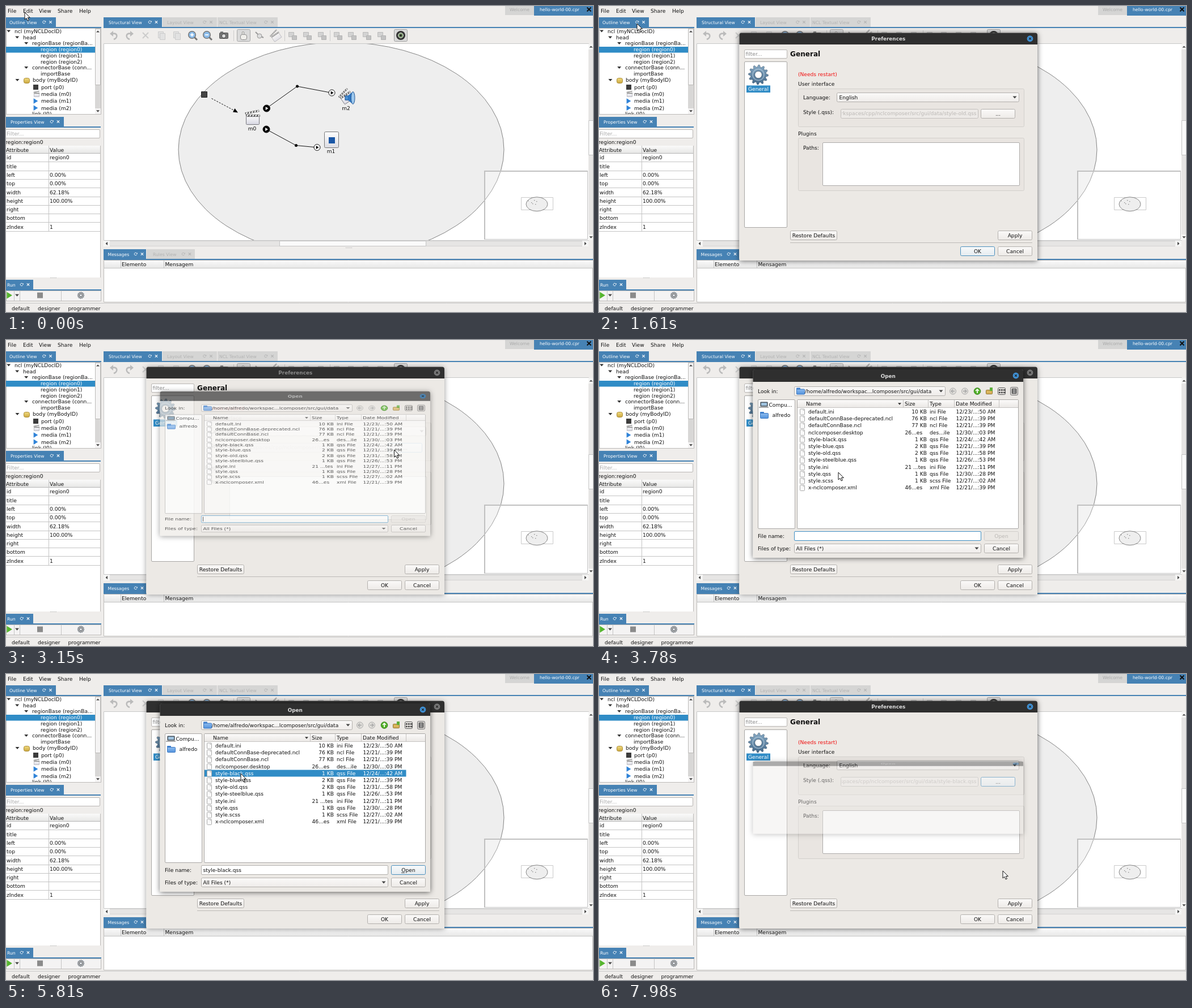
Animation, 1035 px wide and 541 px high, one loop 8000 ms. Source, as an HTML page with a canvas:

```html
<!DOCTYPE html>
<html lang="en">
<head>
<meta charset="utf-8">
<title>Preferences walkthrough</title>
<style>
html, body { margin: 0; width: 100%; height: 100%; overflow: hidden; background: #efedeb; }
canvas { display: block; width: 1035px; height: 541px; }
</style>
</head>
<body>
<canvas id="stage" width="1035" height="541"></canvas>
<script>
const g = document.getElementById('stage').getContext('2d');
const LOOP = 8000, STEP = 70;
const BLUE = '#4682b4', SEL = '#308cc6', BG = '#efedeb', DLG = '#ece9e5', LINE = '#bcbab8';
const FONT = '"DejaVu Sans", sans-serif';

// ---- drawing helpers ----
function rect(x, y, w, h, fill, stroke, r = 0) {
  g.beginPath();
  if (stroke) g.roundRect(x + .5, y + .5, w - 1, h - 1, r);
  else g.roundRect(x, y, w, h, r);
  if (fill) { g.fillStyle = fill; g.fill(); }
  if (stroke) { g.strokeStyle = stroke; g.lineWidth = 1; g.stroke(); }
}
function text(s, x, mid, color = '#111', size = 9.12, align = 'left', weight = '') {
  g.font = `${weight} ${size}px ${FONT}`;
  g.textAlign = align;
  g.fillStyle = color;
  g.fillText(s, x, mid + size * .363);
}
function line(color, width, ...p) {
  g.beginPath();
  for (let i = 0; i < p.length; i += 2) g.lineTo(p[i], p[i + 1]);
  g.strokeStyle = color; g.lineWidth = width; g.stroke();
}
function poly(fill, ...p) {
  g.beginPath();
  for (let i = 0; i < p.length; i += 2) g.lineTo(p[i], p[i + 1]);
  g.closePath();
  g.fillStyle = fill; g.fill();
}
function disc(x, y, r, fill, stroke, w = 1) {
  g.beginPath(); g.arc(x, y, r, 0, 7);
  if (fill) { g.fillStyle = fill; g.fill(); }
  if (stroke) { g.strokeStyle = stroke; g.lineWidth = w; g.stroke(); }
}
function oval(x, y, rx, ry, fill, stroke, w = 1) {
  g.beginPath(); g.ellipse(x, y, rx, ry, 0, 0, 7);
  g.fillStyle = fill; g.fill();
  g.strokeStyle = stroke; g.lineWidth = w; g.stroke();
}
function fade(y, h, a, b) {
  const f = g.createLinearGradient(0, y, 0, y + h);
  f.addColorStop(0, a); f.addColorStop(1, b);
  return f;
}
function at(x, y, draw, scale = 1) {
  g.save(); g.translate(x, y); g.scale(scale, scale); draw(); g.restore();
}
function clip(x, y, w, h, draw) {
  g.save(); g.beginPath(); g.rect(x, y, w, h); g.clip(); draw(); g.restore();
}
const down = (x, y, c = '#333', s = 3.5) => poly(c, x - s, y - s * .55, x + s, y - s * .55, x, y + s * .55);
const up = (x, y) => poly('#444', x - 3, y + 1.6, x + 3, y + 1.6, x, y - 1.6);
const right = (x, y, s, c) => poly(c, x - s * .6, y - s, x - s * .6, y + s, x + s, y);
function cross(x, y, s, c, w = 1.2) {
  line(c, w, x - s, y - s, x + s, y + s);
  line(c, w, x - s, y + s, x + s, y - s);
}

// ---- widgets ----
function tab(s, x, y, w, on, tx, ix) {
  rect(x, y, w, 18, on ? BLUE : '#d5d5d4');
  const c = on ? '#fff' : '#b2b2b2';
  text(s, tx, y + 8.8, c, 7.7);
  g.beginPath(); g.arc(ix, y + 8.5, 2.3, .4, 5.9);
  g.strokeStyle = c; g.lineWidth = .9; g.stroke();
  poly(c, ix + 1.2, y + 8.2, ix + 3.6, y + 8.2, ix + 2.9, y + 6);
  cross(ix + 11.5, y + 8.5, 2.2, c, 1.1);
}
const rule = (x, y, w) => rect(x, y + 17, w, 2, BLUE);
function button(s, x, y, w, o = {}) {
  let fill = fade(y, 16, '#fbfaf9', '#eeebe8');
  if (o.def) fill = fade(y, 16, '#f8fafb', '#e6ecf0');
  if (o.hot) fill = fade(y, 16, '#fff', '#f6f4f2');
  if (o.off) fill = '#ebe8e4';
  if (o.down) fill = '#d9d6d3';
  rect(x, y, w, 17, fill, o.def ? '#4a8fbd' : o.off ? '#d0cdca' : '#b3b0ad', 2);
  text(s, x + w / 2, y + 8.3, o.off ? '#bbb8b5' : '#111', 9.12, 'center');
}
function combo(s, x, y, w, tx) {
  rect(x, y, w, 17, fade(y, 16, '#fbfaf9', '#efecea'), '#b3b0ad', 2);
  text(s, tx, y + 8.4);
  down(x + w - 8, y + 8.5, '#444');
}
const field = (x, y, w, h, edge = '#b9b6b3') => rect(x, y, w, h, '#fff', edge, 1.5);

// ---- icons ----
function clapper() {
  rect(-12, -1, 24, 15, fade(-1, 15, '#fafafa', '#d6d6e2'), '#77777d', 1);
  const bar = () => {
    rect(-12, -4, 25, 3.4, '#484848');
    for (let i = 0; i < 5; i++) poly('#f4f4f4', -10 + i * 5, -3.6, -7 + i * 5, -3.6, -8.5 + i * 5, -1, -11.5 + i * 5, -1);
  };
  bar();
  g.save(); g.translate(-1, -6); g.rotate(-.2); bar(); g.restore();
}
function speaker() {
  rect(-9, -4, 7, 9, '#4a8fd0', '#1d4f8c');
  poly('#2f78c4', -3, -4, 6, -11, 6, 12, -3, 5);
  oval(6, .5, 3.5, 11.5, '#9cc8ee', '#1d4f8c');
}
function gear(x, y, r, c, hole) {
  g.beginPath();
  for (let i = 0; i < 48; i++) {
    const a = i * Math.PI / 24, q = (i % 4 < 2) ? r : r * .79;
    g.lineTo(x + q * Math.cos(a), y + q * Math.sin(a));
  }
  g.closePath(); g.fillStyle = c; g.fill();
  g.strokeStyle = 'rgba(40,60,80,.5)'; g.lineWidth = .8; g.stroke();
  disc(x, y, r * .36, hole, 'rgba(40,60,80,.6)');
}
function folder(x, y) {
  rect(x - 7, y - 6, 7, 4, '#3d7fcf', null, 1);
  rect(x - 7, y - 4, 15, 10, fade(y - 4, 10, '#8fbdf0', '#4f90dc'), '#3d78c0', 1);
}
function zoom(x, y, plus) {
  line('#777', 3, x + 3, y + 3, x + 8, y + 8);
  disc(x - 1, y - 1, 6.3, '#8dbdeb', '#777', 1.5);
  line('#fff', 1.8, x - 4, y - 1, x + 2, y - 1);
  if (plus) line('#fff', 1.8, x - 1, y - 4, x - 1, y + 2);
}
function turn(x, y, dir) {
  at(x, y, () => {
    g.scale(dir, 1);
    g.beginPath(); g.moveTo(-3, -3); g.bezierCurveTo(7, -5, 8, 4, 0, 7);
    g.strokeStyle = '#bbb'; g.lineWidth = 2.6; g.stroke();
    poly('#bbb', -7, -3, -1, -8, -1, 2);
  });
}
function page(x, y) {
  rect(x - 4, y - 5, 9, 11, '#fafafa', '#aaa', 1);
  poly('#ccc', x + 1.5, y - 5, x + 5, y - 1.5, x + 1.5, y - 1.5);
}

// ---- main window ----
function leftSide() {
  tab('Outline View', 0, 20, 88, true, 6, 67);
  rule(0, 20, 168);
  rect(0, 39, 168, 153, '#fff', LINE);
  clip(0, 40, 157, 151, () => {
    rect(0, 72, 157, 10.5, SEL);
    const rows = [['ncl (myNCLDocID)', 15, 44.5], ['head', 30, 55.5], ['regionBase (regionBa...', 46, 66],
      ['region (region0)', 61, 77], ['region (region1)', 61, 87.5], ['region (region2)', 61, 98.5],
      ['connectorBase (conn...', 46, 109], ['importBase', 61, 119.5], ['body (myBodyID)', 47, 131],
      ['port (p0)', 62, 143.5], ['media (m0)', 62, 155.7], ['media (m1)', 62, 168], ['media (m2)', 62, 180.3], ['link (l0)', 46, 191]];
    rows.forEach(([s, x, y], i) => {
      text(s, x, y, i === 3 ? '#fff' : '#111');
      if (i < 3 || i === 6) down(x - 10.3, y);
    });
    down(20, 131);
    rect(31, 127, 11, 10, fade(127, 10, '#f3dd83', '#c9a53c'), '#a98a35', 3);
    rect(48, 139, 9, 9, '#3c3c3c');
    at(54, 155, clapper, .4);
    right(51.5, 168, 4.8, '#2f83d8'); right(51.5, 180.3, 4.8, '#2f83d8');
  });
  rect(157, 40, 10, 151, '#d8d7d6');
  rect(157, 40, 10, 100, '#f5f4f4', LINE);
  rect(157, 181, 10, 10, '#f5f4f4');
  up(162, 45); down(162, 186, '#444', 3);

  tab('Properties View', 0, 196, 102, true, 8, 80.5);
  rule(0, 196, 167);
  rect(0, 215, 167, 265, '#fff');
  rect(0, 215, 167, 32, BG);
  field(-2, 218, 168, 16);
  text('Filter...', 1, 226, '#aaa');
  text('region:region0', -1, 240.5);
  rect(0, 247, 166, 14, fade(247, 14, '#fafafa', '#e6e6e5'));
  text('Attribute', 0, 254.3); text('Value', 77, 254.3);
  const props = ['id,region0', 'title,', 'left,0.00%', 'top,0.00%', 'width,62.18%', 'height,100.00%', 'right,', 'bottom,', 'zIndex,1'];
  props.forEach((p, i) => {
    const y = 268 + i * 15.3, [k, v] = p.split(',');
    text(k, 1, y); text(v, 77, y);
    line('#c4c4c4', 1, 0, Math.round(y + 7.3) + .5, 166, Math.round(y + 7.3) + .5);
  });
  line('#b5b5b5', 1, 0, 260.5, 166, 260.5);
  line('#c4c4c4', 1, 75.5, 247, 75.5, 398);
  line(LINE, 1, 166.5, 247, 166.5, 480);
  for (let i = 0; i < 6; i++) rect(78 + i * 2, 480, 1, 1, '#aaa');

  tab('Run', 0, 484, 48, true, 2, 27.5);
  rule(0, 484, 168);
  rect(0, 503, 168, 19, '#f4f3f3', LINE);
  for (const x of [14.5, 24.5, 97.5]) line('#c4c4c4', 1, x, 503, x, 521);
  right(5, 511.5, 6, '#56b52f');
  down(19.5, 511.5, '#444', 3.5);
  rect(55, 506.5, 10, 10, '#8b8b8b');
  gear(132, 511.5, 6, '#a5a5a5', '#f4f3f3');
}

function toolbar() {
  turn(190, 52, 1); turn(218, 52, -1);
  cross(246, 52, 5, '#ccc', 2);
  for (const x of [274, 301]) { rect(x - 6, 45, 10, 12, '#e2e2e2', '#ccc'); rect(x - 3, 48, 10, 12, '#e2e2e2', '#ccc'); }
  zoom(329, 52, true); zoom(355, 52, false);
  rect(376, 47, 16, 11, '#777', '#555', 1); disc(384, 53, 3.6, '#ddd', '#444'); rect(378, 45, 5, 2, '#888');
  line('#ccc', 1, 401.5, 43, 401.5, 62);
  rect(407, 41, 24, 22, '#dadada', '#a8a8a8', 2);
  rect(413, 50, 12, 10, '#f0efeb', '#888', 3); rect(416, 45, 4, 6, '#f0efeb', '#888', 1);
  line('#999', 2, 440, 46, 446, 52, 454, 56); disc(447, 53, 4, '#ddd', '#999');
  at(475, 52, () => { g.rotate(-.6); g.globalAlpha *= .55; clapper(); }, .65);
  line('#ccc', 1, 491.5, 43, 491.5, 62);
  for (const x of [505, 531, 557, 585, 610, 636, 662]) {
    rect(x - 7, 46, 10, 9, '#d3d3d3', '#bbb'); rect(x - 1, 52, 9, 8, '#c3c3c3', '#b2b2b2');
  }
  line('#ccc', 1, 571.5, 43, 571.5, 62);
  rect(684, 41, 24, 22, '#dadada', '#a0a0a0', 2);
  disc(696, 52, 8, '#333'); disc(696, 52, 4.5, '#79996a', '#ddd'); disc(696, 52, 2, '#222');
}

function node(x, y, dark) {
  disc(x, y, dark ? 6 : 5.5, dark ? '#000' : '#fff', '#111', 1);
  right(x, y, 3, dark ? '#fff' : '#000');
}
function graph() {
  rect(172, 66, 856, 349, '#fff', '#c8c8c8');
  clip(173, 67, 854, 347, () => {
    oval(591, 254, 287, 190, '#eee', '#777', .9);
    rect(344, 151, 11, 11, '#444', '#222');
    g.setLineDash([3, 2]); line('#111', 1, 362.5, 163.5, 402, 184.5); g.setLineDash([]);
    poly('#000', 409, 188.5, 400, 187.5, 403.5, 181);
    line('#111', 1, 459, 181, 513.5, 142, 574, 153.5);
    line('#111', 1, 459, 218, 511.5, 246.5, 548.5, 250);
    disc(513.5, 142, 2.5, '#000'); disc(511.5, 246.5, 2.5, '#000');
    node(459.5, 181, true); node(459, 218, true); node(574.5, 153.5); node(548.5, 250);
    at(435, 196, clapper);
    text('m0', 434, 217, '#111', 9.12, 'center');
    at(599, 159, () => { g.rotate(-.6); clapper(); }, .85);
    at(606, 162, speaker, .95);
    text('m2', 599.5, 181, '#111', 9.12, 'center');
    rect(561, 222, 26, 29, fade(222, 29, '#fff', '#dcdce2'), '#777', 2);
    rect(569, 232, 11, 11, '#1a57a6');
    text('m1', 573, 257, '#111', 9.12, 'center');

    rect(843, 291, 183, 122, 'rgba(255,255,255,.25)', '#c0c0c0');
    line('#c0c0c0', 2, 844, 413, 844, 292, 1025, 292);
    rect(908, 338, 57, 23, null, '#cacaca');
    oval(936, 350.3, 19, 12.5, '#eee', '#777', .9);
    for (const [x, y] of [[920, 344], [926, 347], [928, 349], [935, 345], [931, 343], [933, 350]]) rect(x, y, 1.4, 1.2, '#888');
  });
  rect(1027, 67, 8, 347, '#e6e5e4');
  rect(1027, 67, 8, 10, '#f5f5f4'); rect(1027, 404, 8, 10, '#f5f5f4');
  rect(1027, 202, 9, 62, '#fafafa', '#c4c4c4');
  up(1031.5, 72); down(1031.5, 409, '#444', 3);
  rect(172, 415, 855, 10, '#e6e5e4', '#d4d3d2');
  rect(172, 415, 11, 10, '#f5f5f4'); rect(1016, 415, 11, 10, '#f5f5f4');
  rect(482, 415, 259, 10, '#fafafa', '#c4c4c4');
  poly('#444', 179, 417, 179, 423, 175.5, 420);
  poly('#444', 1020, 417, 1020, 423, 1023.5, 420);
  for (let i = 0; i < 6; i++) rect(599 + i * 2, 427, 1, 1, '#aaa');
}

function mainWindow() {
  rect(0, 0, 1035, 541, BG);
  [['File', 3], ['Edit', 30], ['View', 58], ['Share', 91], ['Help', 129]].forEach(([s, x]) => text(s, x, 8.7));
  rect(880, 0, 51, 16, '#d5d5d4'); text('Welcome', 905.5, 6.3, '#aaa', 7.7, 'center');
  rect(931, 0, 104, 17, BLUE); text('hello-world-00.cpr', 941, 6.3, '#fff', 7.7);
  cross(1028, 6, 3.5, '#111', 2);
  leftSide();
  tab('Structural View', 172, 20, 103, true, 181, 253.5);
  tab('Layout View', 276, 20, 96, false, 284, 350);
  tab('NCL Textual View', 373, 20, 106, false, 376, 458);
  rule(172, 20, 863);
  toolbar();
  graph();
  tab('Messages', 172, 430, 75, true, 179.5, 228.5);
  tab('Rules View', 248, 430, 85, false, 259, 312.5);
  rule(172, 430, 863);
  rect(172, 449, 863, 75, '#fff', LINE);
  rect(173, 450, 862, 14, fade(450, 14, '#fafafa', '#e6e6e5'));
  line('#c4c4c4', 1, 172, 463.5, 1035, 463.5);
  line('#c4c4c4', 1, 202.5, 450, 202.5, 463); line('#c4c4c4', 1, 278.5, 450, 278.5, 463);
  text('Elemento', 204, 456.7); text('Mensagem', 280.5, 456.7);
  line('#c8c8c8', 1, 0, 525.5, 1035, 525.5);
  text('default', 10, 535); text('designer', 56, 535); text('programmer', 109.5, 535);
}

function editMenu(hot) {
  rect(29, 1, 20, 16, SEL); text('Edit', 30, 8.7, '#fff');
  rect(27, 17, 101, 17, hot ? SEL : '#f6f5f4', hot ? '#2a7aad' : '#aaa');
  text('Preferences', 48, 25, hot ? '#fff' : '#111');
}

// ---- dialogs ----
function shell(x, y, w, h, bar, title, active) {
  // the shadow stays outside so that a fading window is not darkened by it
  g.save();
  g.beginPath(); g.rect(0, -200, 1035, 1000); g.roundRect(x, y, w, h, [4, 4, 1, 1]); g.clip('evenodd');
  g.shadowColor = `rgba(0,0,0,${active ? .6 : .4})`; g.shadowBlur = 10; g.shadowOffsetY = 1;
  rect(x, y, w, h, DLG, null, [4, 4, 1, 1]);
  g.restore();
  rect(x, y + bar, w, h - bar, DLG, null, [0, 0, 1, 1]);
  rect(x, y, w, bar, '#2f2f2f', null, [4, 4, 0, 0]);
  text(title, x + w / 2, y + bar / 2 + .3, active ? '#dcdcdc' : '#888', 8.85, 'center', 'bold');
  disc(x + w - 13, y + bar / 2, 5.4, active ? '#3f8fd2' : '#777');
  cross(x + w - 13, y + bar / 2, 1.9, '#222', 1.2);
}

function prefs({ active, style, picked, pressed }) {
  shell(247.5, 47.5, 525.5, 402.5, 20.5, 'Preferences', active);
  field(256, 77, 76, 16); text('filter...', 258.5, 85, '#8a8a8a');
  field(256, 98, 76, 294, '#a9a7a5');
  gear(281, 121.5, 17.5, fade(104, 35, '#86a9c4', '#44698a'), '#fff');
  disc(281, 121.5, 10, null, 'rgba(210,228,240,.5)', 1.5);
  rect(260, 140.5, 42, 12.5, SEL); text('General', 281, 146.5, '#fff', 9.12, 'center');
  text('General', 337, 85, '#111', 12.1, 'left', 'bold');
  text('(Needs restart)', 351, 121, '#f01010');
  text('User interface', 351, 137.3);
  rect(351, 146, 399, 68, '#e9e5e1', '#d3d0cc', 2);
  text('Language:', 360, 161.5); combo('English', 419, 153, 322, 423.5);
  text('Style (.qss):', 360, 187.7);
  rect(426, 182, 243, 17, '#edeae7', '#c3c0bd', 2);
  clip(428, 183, 239, 15, () => text(`workspaces/cpp/nclcomposer/src/gui/data/${style}`, 665.5, 190, '#bcb9b6', 9.12, 'right'));
  button('...', 673, 182, 61, { def: picked, down: pressed });
  text('Plugins', 351, 225.3);
  rect(351, 233, 399, 94, '#e9e5e1', '#d3d0cc', 2);
  text('Paths:', 360, 250.7); field(394, 241, 348, 77, '#adabaa');
  button('Restore Defaults', 337, 397, 83); button('Apply', 703, 397, 61);
  line('#bdbab7', 1, 337, 418.5, 764, 418.5);
  button('OK', 637, 425, 61, { def: !picked }); button('Cancel', 703, 425, 61);
}

const FILES = `default.ini|10 KB|ini|23/...:50 AM
defaultConnBase-deprecated.ncl|76 KB|ncl|21/...:39 PM
defaultConnBase.ncl|77 KB|ncl|21/...:39 PM
nclcomposer.desktop|26...es|des...ile|30/...:03 PM
style-black.qss|1 KB|qss|24/...:42 AM
style-blue.qss|2 KB|qss|21/...:39 PM
style-old.qss|2 KB|qss|31/...:58 PM
style-steelblue.qss|1 KB|qss|26/...:53 PM
style.ini|21 ...tes|ini|27/...:11 PM
style.qss|1 KB|qss|30/...:28 PM
style.scss|1 KB|scss|27/...:02 AM
x-nclcomposer.xml|46...es|xml|21/...:39 PM`.split('\n').map(r => r.split('|'));

const openShell = () => shell(271.5, 52, 476.5, 333, 22, 'Open', true);

function openDialog({ chosen, caret, hover }) {
  openShell();
  text('Look in:', 280, 90.7);
  combo('/home/alfredo/workspac...lcomposer/src/gui/data', 344, 82, 267, 363);
  folder(355, 90.5);
  for (const [x, d] of [[624, -1], [645, 1]]) {
    disc(x, 90.5, 5.5, '#e0deda', '#aaa');
    line('#aaa', 1.8, x - 3, 90.5, x + 3, 90.5);
    line('#aaa', 1.5, x, 87.5, x + d * 3, 90.5, x, 93.5);
  }
  disc(667, 90.5, 5.8, '#4fae25', '#34801a');
  line('#fff', 1.8, 667, 94, 667, 88); line('#fff', 1.5, 664, 90, 667, 87, 670, 90);
  rect(682, 88, 12, 8, '#d9b45c', '#8d6f2c', 1); rect(689, 84, 5, 6, '#5cae3a');
  for (let i = 0; i < 6; i++) rect(705 + i % 3 * 4, 87 + (i > 2) * 4.5, 2.8, 2.8, null, '#222');
  rect(703, 84, 14, 13, null, '#555', 2);
  rect(725, 83, 14, 15, '#d3d0cd', '#777', 2); rect(728, 86, 8, 9, '#fff', '#222');
  for (let i = 0; i < 3; i++) line('#222', 1, 729, 88.5 + i * 2, 735, 88.5 + i * 2);

  field(280, 105, 66, 229, '#a9a7a5');
  rect(284, 109, 14, 9, '#4d565e', '#8a959e', 1); rect(286, 111, 10, 5, '#9fc3df'); rect(282, 118, 17, 2, '#aaa');
  text('Compu...', 299.5, 114.5); folder(291, 133); text('alfredo', 305.5, 132.7);
  field(349, 105, 391, 229, '#a9a7a5');
  rect(350, 106, 389, 14, fade(106, 14, '#fbfaf9', '#eae7e4'));
  line('#c6c4c2', 1, 350, 119.5, 739, 119.5);
  [['Name', 365, 536], ['Size', 539, 580], ['Type', 583, 626], ['Date Modified', 629, 705]].forEach(([s, x, e]) => {
    text(s, x, 112.5); line('#c6c4c2', 1, e + .5, 106, e + .5, 119);
  });
  down(530, 113, '#333', 3);
  FILES.forEach(([name, size, kind, date], i) => {
    const y = 126.5 + i * 12.23, on = chosen && i === 4, c = on ? '#fff' : '#111';
    if (on) rect(350, y - 6, 355.5, 12, SEL);
    page(358, y);
    text(name, 369, y, c);
    if (size.endsWith('KB')) text(size, 578, y, c, 9.12, 'right');
    else text(size, 539.5, y, c);
    text(kind.includes('.') ? kind : kind + ' File', 583, y, c);
    text('12/' + date, 629.5, y, c);
  });
  text('File name:', 280, 346.7);
  field(344, 338, 330, 17, chosen ? '#b3b0ad' : '#3f8fc4');
  if (chosen) text(FILES[4][0], 347.5, 346.7);
  if (caret) rect(347, 341, 1, 11, '#111');
  button('Open', 679, 338, 61, { off: !chosen, def: chosen, hot: hover === 1 });
  if (chosen) line('#222', .8, 697, 351.5, 703, 351.5);
  text('Files of type:', 280, 368.2);
  combo('All Files (*)', 344, 360, 330, 347.5);
  button('Cancel', 679, 360, 61, { hot: hover === 2 });
}

// Window effect: vertical squash about the centre with fading
function squash(cy, k, alpha, draw) {
  g.save();
  g.globalAlpha = alpha;
  g.translate(0, cy); g.scale(1, k); g.translate(0, -cy);
  draw();
  g.restore();
}
function appear(t, start, cy, draw) {
  const p = Math.min(1, (t - start + STEP) / 210);
  if (p >= 1) draw();
  else if (p > 0) squash(cy, .3 + .7 * p, p, draw);
}

// ---- pointer ----
const PATH = [[0, 33, 11], [560, 33, 11], [1050, 53, 27], [1400, 53, 27], [1610, 67, 31], [2170, 541, 210],
  [2800, 692, 193], [3080, 692, 193], [3780, 422, 234], [4060, 476, 214], [4550, 409, 188], [4760, 409, 183],
  [5040, 409, 183], [5250, 410, 192], [5320, 410, 192], [5600, 414, 176], [6160, 414, 176], [6860, 689, 336],
  [7070, 689, 336], [7350, 712, 370], [7490, 712, 370], [7700, 712, 348], [8000, 712, 348]];
function pointer(t) {
  const i = PATH.findIndex(k => k[0] > t), [a, x, y] = PATH[i - 1], [b, u, v] = PATH[i];
  const p = (t - a) / (b - a), e = p * p * (3 - 2 * p);
  return [x + (u - x) * e, y + (v - y) * e];
}
function drawPointer(x, y) {
  g.save();
  g.translate(x, y);
  poly('#fff', 0, 0, 0, 13, 3, 10.4, 5.2, 15, 7.4, 14, 5.3, 9.6, 9.4, 9.6);
  g.strokeStyle = '#111'; g.lineWidth = 1; g.stroke();
  g.restore();
}

function draw(now) {
  const t = Math.floor((now % LOOP) / STEP) * STEP;
  const [x, y] = pointer(t);
  const closing = t >= 7910, opened = t >= 3080;
  mainWindow();
  if (t >= 210 && t < 1400) editMenu(y > 17);
  appear(t, 1400, 249, () => prefs({
    active: !opened || closing, picked: opened, pressed: t === 2940,
    style: closing ? 'style-black.qss' : 'style-old.qss'
  }));
  if (closing) {
    const late = t >= 7980;
    squash(218.5, late ? .385 : .72, late ? .4 : .7, openShell);
  } else if (opened) {
    const inX = x >= 679 && x < 740;
    appear(t, 3080, 218.5, () => openDialog({
      chosen: t >= 5740,
      caret: t < 3640 || (t >= 4130 && t < 4690) || (t >= 5180 && t < 5740),
      hover: inX && y >= 338 && y < 355 ? 1 : inX && y >= 360 ? 2 : 0
    }));
  }
  drawPointer(x, y);
}

const begin = performance.now();
function tick() {
  draw(performance.now() - begin);
  requestAnimationFrame(tick);
}
tick();
</script>
</body>
</html>
```
